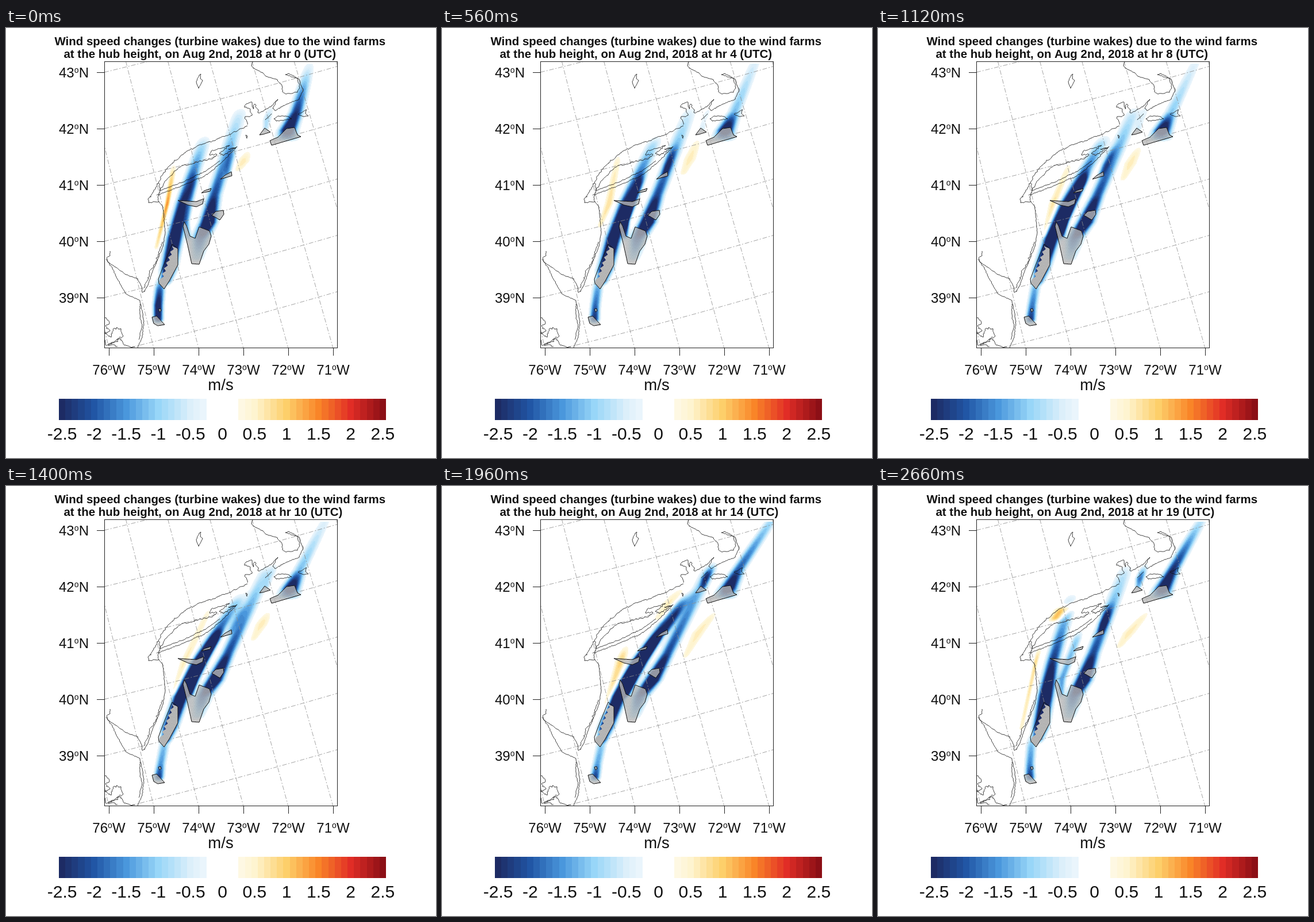
These frames come from a looping animation (748 px wide and 748 px high, 2800 ms). An HTML page with a canvas:

```html
<!DOCTYPE html>
<html lang="en">
<head>
<meta charset="utf-8">
<title>Turbine wakes</title>
<style>
html, body { margin: 0; width: 100%; height: 100%; overflow: hidden; background: #fff; }
canvas { display: block; width: 748px; height: 748px; }
</style>
</head>
<body>
<canvas id="stage" width="748" height="748"></canvas>
<script>
const ctx = document.getElementById('stage').getContext('2d');
const FONT = '"Liberation Sans", Arial, sans-serif';
const STEP = 140, HOURS = 20;
const BOX = { x: 171, y: 58, w: 406, h: 499 };
const mix = (a, b, t) => a + (b - a) * t;
const smooth = t => { t = Math.min(1, Math.max(0, t)); return t * t * (3 - 2 * t); };

// Colour stops every 0.5 m/s from -2.5 to 2.5, sampled into 51 cells
const STOPS = ['#1d2b64', '#2156a5', '#4a97dc', '#98d6f8', '#dceffa', '#ffffff',
  '#fef4d0', '#fdcf6a', '#f98528', '#e12d26', '#8c0f16']
  .map(h => [1, 3, 5].map(k => parseInt(h.slice(k, k + 2), 16)));
const PALETTE = Array.from({ length: 51 }, (_, i) => {
  if (Math.abs(i - 25) < 3) return STOPS[5];
  const k = Math.min(9, Math.floor(i / 5));
  return STOPS[k].map((c, n) => Math.round(mix(c, STOPS[k + 1][n], i / 5 - k)));
});

// Values given as a list are interpolated between these hours
const KEY_HOURS = [0, 2, 6, 10, 14, 17, 19];
function at(v, hour) {
  if (!Array.isArray(v)) return v;
  let i = 1;
  while (hour > KEY_HOURS[i]) i++;
  const from = KEY_HOURS[i - 1];
  return mix(v[i - 1], v[i], (hour - from) / (KEY_HOURS[i] - from));
}

// Eastward drift of the wakes for three parts of the sea
const SOUTH = [.05, .3, .45, .8, 1, .1, -.05];
const MIDDLE = [0, .3, .5, .8, 1, .65, .4];
const NORTH = [0, .25, .45, .6, 1, .95, .75];

// Node: y, x, lean (px at full drift), half width, strength in m/s
const streaks = [];
const streak = (sign, drift, ...nodes) => streaks.push({ sign, drift, nodes });
const wake = (drift, ...nodes) => streak(-1, drift, ...nodes);
const gust = (...nodes) => streak(1, 0, ...nodes);

wake(SOUTH, [517, 264, 0, 8, 2.7], [482, 264, 6, 8, [3, 1.8, 2, 1.5, 1.4, 1.8, 1.6]], [425, 269, 13, 9, .9]);
wake(SOUTH, [452, 275, 0, 8, 1], [420, 282, 3, 12, 3.6], [365, 292, 15, 12, 4],
  [305, 305, 35, 11, [2.8, 2.6, 3, 3.2, 4, 2.4, 2.4]], [175, 346, 90, 12, [.3, .2, .4, .4, .8, .7, .3]]);
wake(MIDDLE, [411, 330, 0, 10, .5], [367, 337, 6, 14, 2], [338, 351, 14, 13, 4],
  [290, 362, 30, 11, 2.2], [125, 413, 62, 13, [.3, .2, .4, .4, .7, .6, .4]]);
wake(MIDDLE, [372, 317, 0, 5, 1.2], [335, 314, 14, [5, 5, 7, 9, 11, 10, 7], [1, 2.6, 3.5, 4, 4, 2.8, 1.4]],
  [242, 332, 55, 8, [.5, .5, 1.2, 2, 2, 1.3, .9]]);
wake(NORTH, [202, 487, 0, 20, .2], [177, 490, 8, 14, 3.4], [145, 505, 10, 11, [2.4, 1.4, 1, 1.2, 2, 2.4, 2.5]],
  [62, 528, 43, 10, [.3, .6, .4, .45, .9, .9, .75]]);
wake(MIDDLE, [185, 450, 0, 5, .7], [161, 453, 5, 7, [.8, .2, .4, .4, 1.6, 2, 1.8]], [125, 464, 13, 7, .5]);
wake(MIDDLE, [263, 384, 0, 5, .9], [238, 388, 11, 7, [.8, .8, 1.5, .9, 1, 1.6, 1.8]], [195, 397, 27, 8, .6]);
gust([[390, 335, 370, 368, 400, 375, 430], [259, 257, 284, 288, 278, 272, 247], 0, 4, .5],
  [305, [280, 282, 298, 310, 310, 283, 274], 0, [4, 8, 7, 8, 9, 8, 4], [1.4, .7, .8, .6, .9, 1.4, .8]],
  [[225, 170, 245, 200, 265, 268, 268], [294, 301, 317, 360, 325, 292, 284], 0, 6, .4]);
gust([[255, 255, 268, 275, 305, 315, 288], [398, 412, 418, 425, 418, 405, 413], 0, 5, .4],
  [[232, 225, 230, 240, 255, 255, 255], [412, 428, 433, 444, 445, 445, 436], 0, 11, .62],
  [[200, 180, 180, 205, 205, 170, 205], [427, 442, 459, 464, 486, 540, 480], 0, 6, .4]);
gust([240, [372, 372, 372, 372, 372, 312, 300], 0, 9, [0, 0, 0, 0, .5, .8, .9]],
  [[205, 205, 205, 205, 205, 192, 214], [395, 395, 395, 395, 395, 392, 324], 0, 14, [0, 0, 0, 0, .65, 1.15, 1.6]],
  [[165, 165, 165, 165, 165, 125, 190], [428, 428, 428, 428, 428, 474, 352], 0, 9, [0, 0, 0, 0, .4, .55, .7]]);

function addStreak(field, { sign, drift, nodes }, hour) {
  const push = at(drift, hour);
  const pts = nodes.map(n => {
    const [y, x, lean, w, s] = n.map(v => at(v, hour));
    return [y, x + lean * push, w, s];
  });
  const bottom = pts[0][0], top = pts[pts.length - 1][0];
  for (let y = Math.max(BOX.y, Math.ceil(top)); y < Math.min(BOX.y + BOX.h, bottom); y++) {
    let i = 1;
    while (i < pts.length - 1 && y < pts[i][0]) i++;
    const a = pts[i - 1], b = pts[i], t = (a[0] - y) / (a[0] - b[0]);
    const [x, w, s] = [1, 2, 3].map(k => mix(a[k], b[k], t));
    const fade = smooth((bottom - y) / 12) * (top < 75 ? 1 : smooth((y - top) / 30));
    const end = Math.min(BOX.x + BOX.w - 1, Math.ceil(x + 2.6 * w));
    for (let px = Math.max(BOX.x, Math.floor(x - 2.6 * w)); px <= end; px++) {
      const d = Math.abs(px - x) / w;
      field[(y - BOX.y) * BOX.w + px - BOX.x] += sign * s * fade * Math.exp(-Math.pow(d, 2.3));
    }
  }
}

function drawField(hour) {
  const field = new Float32Array(BOX.w * BOX.h);
  streaks.forEach(s => addStreak(field, s, hour));
  const img = ctx.createImageData(BOX.w, BOX.h);
  field.forEach((v, i) => {
    const c = PALETTE[Math.min(50, Math.max(0, Math.round(v * 10) + 25))];
    for (let k = 0; k < 3; k++) img.data[i * 4 + k] = c[k];
    img.data[i * 4 + 3] = 255;
  });
  ctx.putImageData(img, BOX.x, BOX.y);
}

// Coastlines: a few points, broken up with seeded noise
const shores = [];
function shore(amp, ...p) {
  let s = (shores.length + 1) * 7919;
  const noise = () => ((s = (s * 16807) % 2147483647) / 2147483647 - 0.5) * amp * 2;
  const out = [p[0], p[1]];
  for (let i = 2; i < p.length; i += 2) {
    const [x0, y0, x1, y1] = p.slice(i - 2, i + 2);
    const n = Math.max(1, Math.round(Math.hypot(x1 - x0, y1 - y0) / 2.5));
    for (let k = 1; k < n; k++) out.push(mix(x0, x1, k / n) + noise(), mix(y0, y1, k / n) + noise());
    out.push(x1, y1);
  }
  shores.push(out);
}
// inland lake
shore(.6, 336,82, 339,80, 338,88, 342,91, 335,105, 331,93, 336,82);
// cape and bay
shore(.9, 430,58, 427,66, 434,72, 447,78, 452,84, 470,89, 480,100, 481,111, 487,115, 507,112,
  511,104, 507,88, 486,81, 492,79, 509,88, 517,108, 510,124, 482,135, 468,144, 464,140, 473,124,
  461,137, 440,148);
shore(1.6, 440,148, 433,132, 430,141, 428,129, 418,132, 415,138, 425,141, 428,152, 416,154, 420,168);
// sound and long island
shore(1.3, 420,170, 385,187, 340,203, 315,214, 285,239, 272,256, 262,276, 250,294);
shore(1.3, 268,283, 276,267, 295,248, 308,239, 358,228, 367,220, 354,221, 357,214, 389,204, 371,218,
  378,222, 402,206);
shore(1, 402,206, 372,237, 345,258, 300,277, 262,291);
shore(.8, 372,231, 345,250, 312,266, 268,283);
// harbour and ocean shore
shore(1.3, 253,293, 247,298, 248,304, 266,302, 264,294, 268,286, 266,270);
shore(.6, 266,302, 273,312, 277,355, 273,380, 254,426, 246,449, 240,459);
shore(1.8, 272,372, 261,406, 250,426, 241,452);
// southern bays
shore(.6, 181,388, 181,396, 175,400, 177,407, 209,429, 229,436, 236,450, 237,460, 242,457);
shore(.7, 174,402, 185,418, 194,437, 208,462, 233,474, 240,510, 237,538, 229,557);
shore(.8, 233,480, 233,505, 237,516, 231,542);
shore(2, 171,504, 180,513, 173,518, 181,527, 172,531, 183,538, 188,522, 200,523, 204,536, 178,551,
  200,541, 206,552, 224,555);
shore(1.5, 171,541, 173,551, 188,551, 194,554);
// islands
shore(.8, 466,158, 474,153, 491,154, 497,158, 470,162, 466,158);
shore(.6, 508,150, 523,142, 521,149, 526,153, 517,154, 508,150);
shore(.5, 417,186, 420,188, 419,192, 417,186);
shore(.6, 451,160, 462,149);
shore(.7, 387,211, 400,208, 387,211);

const farms = [];
const farm = (...p) => farms.push(p);
farm(254,503, 262,501, 276,516, 264,518, 257,514);
farm(310,337, 314,344, 320,362, 329,366, 336,346, 354,353, 357,362, 353,376, 344,388, 336,411,
  323,410, 316,378, 308,345);
farm(299,300, 331,302, 344,297, 342,306, 331,311, 317,308);
farm(340,287, 345,283, 357,279, 355,284);
farm(373,263, 381,256, 392,250, 393,257);
farm(358,326, 365,319, 378,317, 379,324, 372,334, 362,328);
farm(441,186, 450,174, 460,181, 447,185);
farm(459,196, 473,190, 488,175, 502,173, 507,186, 513,189, 462,204);
farm(265,489, 269,488, 270,492, 267,494);

// The shore farm has a scalloped western side inside its outline
const EAST_SIDE = [299,384, 299,412, 284,440, 275,454, 266,444];
const SHORE_FARM = [289,376, ...EAST_SIDE, 265,437, 274,413];
const SHORE_FILL = [...EAST_SIDE];
for (let k = 0; k <= 12; k++) {
  SHORE_FILL.push(mix(270, 291, k / 12) + (k % 2 ? 3 : -2), mix(437, 380, k / 12));
}

function trace(p, close) {
  ctx.beginPath();
  for (let i = 0; i < p.length; i += 2) ctx.lineTo(p[i], p[i + 1]);
  if (close) ctx.closePath();
}

function line(x1, y1, x2, y2) {
  ctx.beginPath();
  ctx.moveTo(x1, y1);
  ctx.lineTo(x2, y2);
  ctx.stroke();
}

function drawGrid() {
  ctx.strokeStyle = '#8c8c8c';
  ctx.lineWidth = 0.8;
  ctx.setLineDash([8, 3, 2, 3]);
  for (let i = 0; i < 8; i++) line(62 + 73.2 * i, BOX.y, 179 + 78 * i, BOX.y + BOX.h);
  for (let y = 77; y < 680; y += 98) {
    ctx.beginPath();
    for (let u = 0; u <= BOX.w; u += 14) ctx.lineTo(BOX.x + u, y - 0.243 * u - 0.00006 * u * u);
    ctx.stroke();
  }
  ctx.setLineDash([]);
}

function hatch(p) {
  ctx.save();
  trace(p, true);
  ctx.clip();
  ctx.fillStyle = 'rgba(222,222,222,.68)';
  ctx.fillRect(BOX.x, BOX.y, BOX.w, BOX.h);
  ctx.strokeStyle = 'rgba(120,120,120,.8)';
  ctx.lineWidth = 0.9;
  const xs = p.filter((_, i) => i % 2 === 0), ys = p.filter((_, i) => i % 2);
  const x0 = Math.min(...xs), x1 = Math.max(...xs), y1 = Math.max(...ys);
  for (let y = Math.min(...ys) - 2; y < y1 + 2; y += 2.4) {
    ctx.beginPath();
    for (let x = x0; x <= x1; x++) ctx.lineTo(x, y + 0.7 * Math.sin(x * 0.8));
    ctx.stroke();
  }
  ctx.restore();
}

function outline(p) {
  ctx.strokeStyle = '#111';
  ctx.lineWidth = 1;
  trace(p, true);
  ctx.stroke();
}

function drawFarms() {
  farms.forEach(p => { hatch(p); outline(p); });
  trace(SHORE_FILL, true);
  ctx.fillStyle = '#b2b2b2';
  ctx.fill();
  hatch(SHORE_FILL);
  outline(SHORE_FARM);
}

function text(s, x, y, size, align = 'center', weight = 'normal') {
  ctx.font = `${weight} ${size}px ${FONT}`;
  ctx.textAlign = align;
  ctx.fillText(s, x, y);
  return ctx.measureText(s).width;
}

// The degree sign is a small raised letter
function degrees(n, side, cx, y) {
  const size = 24;
  ctx.font = `normal ${size}px ${FONT}`;
  let x = cx - ctx.measureText(n + side).width / 2 - 4;
  x += text(n, x, y, size, 'left');
  text('o', x, y - 8, 14, 'left');
  text(side, x + 8, y, size, 'left');
}

function drawFrame(hour) {
  ctx.fillStyle = '#fff';
  ctx.fillRect(0, 0, 748, 748);
  drawField(hour);

  ctx.save();
  ctx.beginPath();
  ctx.rect(BOX.x, BOX.y, BOX.w, BOX.h);
  ctx.clip();
  drawGrid();
  ctx.strokeStyle = '#111';
  ctx.lineWidth = 0.8;
  shores.forEach(p => { trace(p); ctx.stroke(); });
  drawFarms();
  ctx.restore();

  ctx.strokeStyle = '#222';
  ctx.lineWidth = 1;
  ctx.strokeRect(BOX.x + 0.5, BOX.y + 0.5, BOX.w - 1, BOX.h - 1);

  ctx.fillStyle = '#111';
  text('Wind speed changes (turbine wakes) due to the wind farms', 84.5, 29.5, 20.45, 'left', 'bold');
  text(`at the hub height, on Aug 2nd, 2018 at hr ${hour} (UTC)`, 100.5, 52, 20.45, 'left', 'bold');
  for (let i = 0; i < 5; i++) {
    const y = 77 + i * 98;
    degrees(String(43 - i), 'N', 118, y + 8.5);
    line(158, y + 0.5, BOX.x, y + 0.5);
  }
  for (let i = 0; i < 6; i++) {
    const x = Math.round(179 + i * 78);
    degrees(String(76 - i), 'W', x, 603);
    line(x + 0.5, 557, x + 0.5, 570);
  }
  text('m/s', 373.5, 630, 27.5);

  const cell = 569 / 51;
  PALETTE.forEach((c, i) => {
    ctx.fillStyle = `rgb(${c})`;
    const x = Math.round(92 + i * cell);
    ctx.fillRect(x, 645, Math.round(92 + (i + 1) * cell) - x, 37);
  });
  ctx.fillStyle = '#111';
  for (let i = 0; i <= 10; i++) text(String(i / 2 - 2.5), 97.6 + i * 5 * cell, 716, 30);
}

const start = performance.now();
let shown = -1;
function tick() {
  const hour = Math.floor((performance.now() - start) / STEP) % HOURS;
  if (hour !== shown) drawFrame(shown = hour);
  requestAnimationFrame(tick);
}
tick();
</script>
</body>
</html>
```
